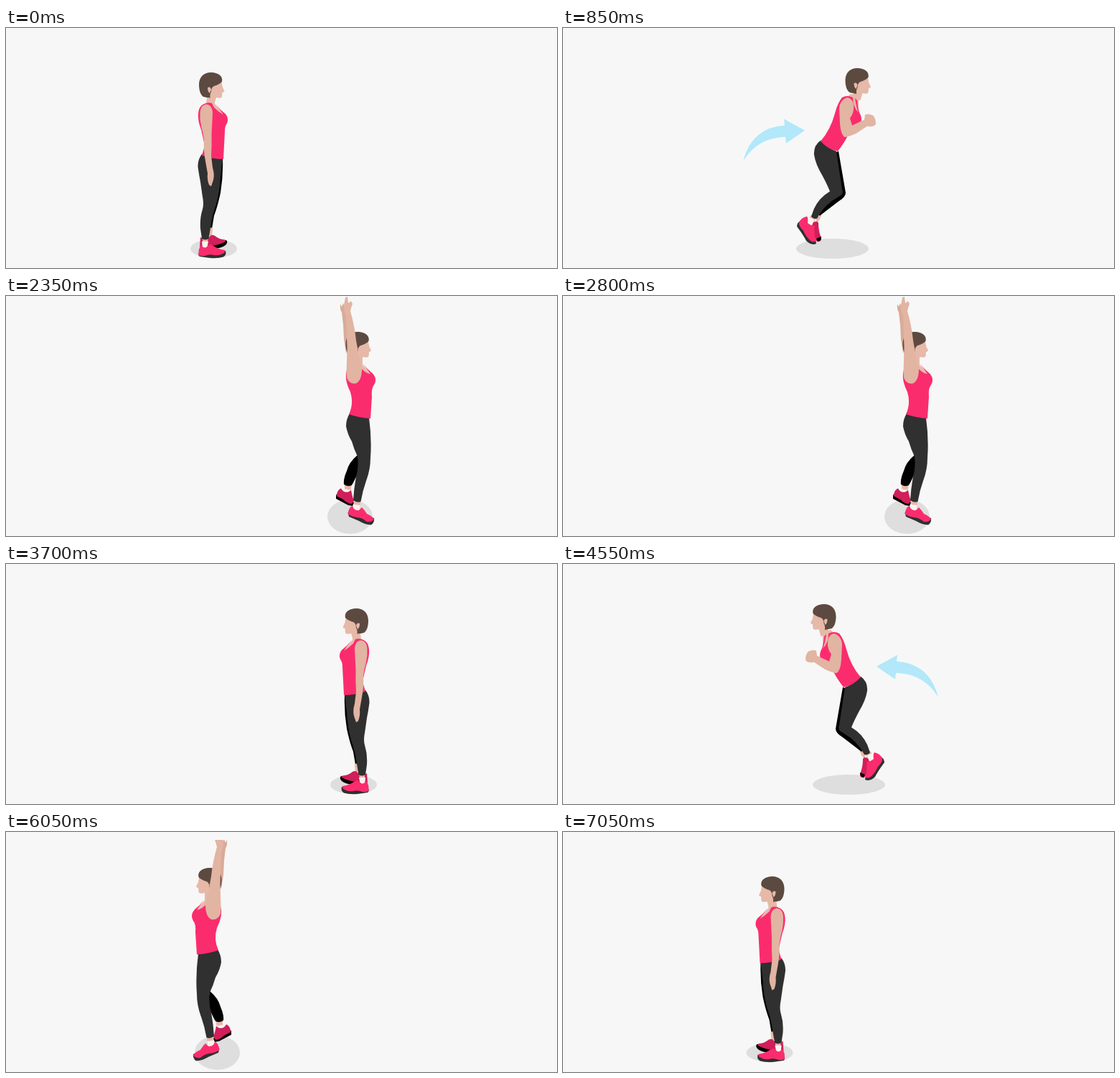
Write an HTML page that moves like this. It is 768 px wide and 335 px high and loops after 7.4 s.

```html
<!DOCTYPE html>
<html lang="en">
<head>
<meta charset="utf-8">
<title>Jump and jacks</title>
<style>
html, body { margin: 0; width: 100%; height: 100%; overflow: hidden; background: #f7f7f7; }
svg { display: block; width: 100vw; height: 100vh; }
.pose { display: none; }
.skin { fill: #e2b4a2; }
.face { fill: #e6b9a8; }
.far { fill: #d9ab98; }
.hair { fill: #5c4a40; }
.top { fill: #fb2c6d; }
.pants { fill: #303030; }
.black { fill: #000; }
.shoe { fill: #fb2c6d; }
.shoe2 { fill: #d01f5a; }
.sock { fill: #fbf3f0; }
.shade { fill: #dedede; }
.arrow { fill: #b2e8fa; }
</style>
</head>
<body>
<svg viewBox="0 0 768 335">
<defs>
  <g id="head">
    <path class="face" d="M284 74L300 72Q301 80 302 83L304.500 88Q304 90 301.500 90L301 96Q300 99 293 97L290 107L279 105L281 90Z"/>
    <path class="hair" d="M301 75C303 67 295 62 286 62C275 62 269 69 269 79C269 87 271 93 275 96L284.500 98Q284 92 286 89Q286 83 290 81Q297 79 301 75Z"/>
    <path class="face" d="M281 83Q285 81 286 86L284 91Q281 89 281 83Z"/>
  </g>

  <g id="feet">
    <path class="face" d="M283 278L288 279L287 290L283 290Z"/>
    <path class="black" d="M283 298L307 296Q310 299 306 303Q300 308 291 307L282 305Z"/>
    <path class="shoe2" d="M271 292Q277 296 283 292Q286 287 291 290Q297 295 305 295.500Q308 297 304 299Q297 303 285 304L270 306Z"/>
    <path class="face" d="M274 291L282 291L281 301L274 301Z"/>
    <path class="sock" d="M273 298L282 298L280 308L274 308Z"/>
    <path class="pants" d="M268.500 314L306 311Q308 316 303 319.500Q296 322 284 321L270 319Q268 318 268.500 314Z"/>
    <path class="shoe" d="M268.500 317Q268 307 272 303Q276 308 279 306L284 302Q289 303 292 306Q298 309 305 310Q306 313 302 315Q297 318 290 317Q284 315 277 318Q272 319 268.500 317Z"/>
  </g>

  <g id="upper">
    <use href="#head" x="124.500" y="-6"/>
    <g transform="matrix(-1 0 0 1 774 0)">
      <path class="face" d="M362 94L373 92L380 98L372 122L362 118Z"/>
      <path class="top" d="M370 97Q378 93 385 97Q391 104 395 119Q401 142 415 158Q404 170 391 172Q381 159 377 150L362 136Q356 130 359 122Q363 115 364 101L367 98Q365 112 362 118Q370 111 370 97Z"/>
      <path class="skin" d="M369 108Q370 98 378 97Q388 100 389 112L388 133Q387 148 382 152Q378 153 365 147L350 137Q341 139 338 134Q338 126 342 122Q348 119 353 121L354 128L371 136L374 126Q368 118 369 108Z"/>
    </g>
  </g>

  <g id="stand">
    <ellipse class="shade" cx="289.500" cy="308" rx="32.500" ry="13"/>
    <path class="black" d="M292 181L302 182Q303 206 299 230Q295 249 290 262L287 280L281 279Z"/>
    <use href="#feet"/>
    <path class="pants" d="M273 176Q267 184 267.500 194Q269 205 271 215L274 236Q276 245 274 253Q270 265 271 280L273 294Q278 297 282.500 294L285 279Q287 262 293 246Q298 228 299 207L302 182Z"/>
    <use href="#head"/>
    <path class="face" d="M281 97L291 99L291 106L304 122L288 121L279 106Z"/>
    <path class="top" d="M274 107Q280 103 287 105L290 111Q296 117 303 121L292 106Q298 114 306 120Q311 126 308 133Q305 137 305 144L303 183Q288 183 273 178L277 164L272 142Q267 129 268 119Q269 110 274 107Z"/>
    <path class="skin" d="M270.500 119Q271 107 280 106.500Q288 108 288 119L286.500 148Q287 162 286 178L288 195Q291 205 289 212L286 221L283 219Q280 211 281 203L278 186Q275 170 276 157Q275 147 272 137Q270 127 270.500 119Z"/>
  </g>

  <g id="jump">
    <ellipse class="shade" cx="375.500" cy="308" rx="50.500" ry="14"/>
    <g transform="matrix(-1 0 0 1 774 0)">
      <path class="face" d="M412 256L421 264L421 273L416 267Z"/>
      <path class="shoe2" d="M418 272Q420 268 427 272L427 288L420 298Q413 299 414 293Q418 284 418 272Z"/>
      <path class="black" d="M414 291L421 294L419 298Q414 298 414 291Z"/>
      <path class="face" d="M420 264L428 261L434 270L427 274Z"/>
      <path class="sock" d="M424 267L432 264L437 273L427 276Z"/>
      <path class="pants" d="M440 267Q448 271 448 277Q439 289 435 297Q428 304 421 301L422 295Z"/>
      <path class="shoe" d="M423 276Q429 276 433 272Q432 265 434 263Q441 264 445 271Q446 276 439 283Q435 292 429 297Q424 300 421 297Q425 287 423 276Z"/>
      <path class="black" d="M390 172L395 174L388 231L420 258L416 262L390 242Q380 236 380 230Z"/>
      <path class="pants" d="M415 157Q425 164 424 177Q422 190 413 205Q406 218 402 228Q417 237 424 252L428 263Q425 267 420 266Q412 251 400 242L386 233Q383 230 385 225L393 172Q405 168 415 157Z"/>
    </g>
    <use href="#upper"/>
    <path class="arrow" d="M337 143L308 127L309 136Q263 139 251 186Q271 153 310 152L311 161Z"/>
  </g>

  <g id="jack">
    <ellipse class="shade" cx="479.500" cy="308" rx="31.500" ry="24"/>
    <path class="far" d="M466 11L468 15L470 10L475 24L479 60L474 80L471 60L470 40L468 23Q465 18 466 11Z"/>
    <path class="face" d="M472 261L482 263L480 273L472 272Z"/>
    <path class="sock" d="M470 269L481 271L480 278L471 277Z"/>
    <path class="black" d="M460 277L485 288L483 293L477 292L460 283Z"/>
    <path class="shoe2" d="M460.500 279Q462 270 467 268.500Q471 276 478 273L481 271Q483 281 485 286L482 290Q476 290 470 284Z"/>
    <path class="black" d="M490 222Q478 232 475 244Q470 255 471 263Q477 267 482 264Q487 256 493 240Z"/>
    <path class="face" d="M485 284L494 286L494 296L486 295Z"/>
    <path class="sock" d="M484 291L494 292L492 301L484 298Z"/>
    <path class="pants" d="M476.500 302L513 310Q514 316 509 319.500Q500 319 492 314L478 308Z"/>
    <path class="shoe" d="M476.500 304Q478 294 483 293Q485 300 492 299L496 295Q500 299 503 304Q512 308 513 312Q509 316 503 315Q496 309 489 309Q481 308 476.500 304Z"/>
    <path class="pants" d="M479 164Q474 172 474 182Q476 193 482 203Q485 214 490 224Q492 238 488 252Q485 268 484 285Q489 289 494.500 287Q497 272 502 258Q508 242 508 226Q510 199 506 170Z"/>
    <use href="#head" x="204.500" y="-12"/>
    <path class="face" d="M488 83L497 86L497 96L510 111L492 111Z"/>
    <path class="top" d="M475 103L493 99Q501 108 508 109L497 94Q503 102 511 108Q518 116 513 124Q509 129 510 140L508 171Q492 170 478 165Q485 150 480 134Q471 116 475 103Z"/>
    <path class="skin" d="M474.500 107L475.500 72L474 28Q470 19 471 13L473 2L476 1L477 10L481 7L483 11Q481 16 480 21Q486 42 488 62Q491 82 496 101Q496 118 488 122Q479 124 475 114Z"/>
  </g>

  <g id="up">
    <path class="arrow" d="M422 101L439 128H430V158H414V128H405Z"/>
    <path class="arrow" d="M414 162H430V167H414ZM414 170H430V175H414Z"/>
  </g>
</defs>

<g id="stage">
  <g class="pose" data-name="start"><use href="#stand"/></g>
  <g class="pose" data-name="squat">
    <g data-hip="298,199"></g>
    <use href="#up" transform="matrix(1 0 0 -1 -184 276)"/>
  </g>
  <g class="pose" data-name="leap"><use href="#jump"/></g>
  <g class="pose" data-name="land">
    <g data-hip="281,205" transform="translate(196)"></g>
    <path class="arrow" transform="translate(357 110)" d="M43 86L27 57L36 58Q39 12 0 0Q50 10 52 58L61 57Z"/>
  </g>
  <g class="pose" data-name="rise"><use href="#stand" x="196.500"/><use href="#up"/></g>
  <g class="pose" data-name="rest"><use href="#stand" x="196.500"/></g>
  <g class="pose" data-name="jack"><use href="#jack"/></g>
</g>
<rect id="crop" width="768" height="11" fill="#f7f7f7"/>
</svg>
<script>
const HALF = 3700, JACKS = 1900;
const steps = [[350, 'start'], [850, 'squat'], [1050, 'leap'], [1550, 'land'], [JACKS, 'rise']];
const stage = document.getElementById('stage');
const crop = document.getElementById('crop');
const poses = document.querySelectorAll('.pose');

// Bent legs over planted feet, with the torso leaning from the hip point
function crouch(x, y) {
  const leg = (cls, dx) => `<path class="${cls}" transform="translate(${dx})" d="M${x - 14} ${y - 8}
    Q${x - 28} ${y + 2} ${x - 22} ${y + 17} Q${x - 14} ${y + 30} 294 243 Q278 262 273 293
    Q278 297 283 294 Q292 272 312 251 Q319 243 313 234 L${x + 11} ${y + 8}Z"/>`;
  return `<ellipse class="shade" cx="289.500" cy="308" rx="32.500" ry="13"/>
    ${leg('black', 4)}<use href="#feet"/>${leg('pants', 0)}
    <use href="#upper" transform="translate(${x - 372} ${y - 165}) rotate(10 372 165)"/>`;
}
for (const g of document.querySelectorAll('[data-hip]'))
  g.innerHTML = crouch(...g.dataset.hip.split(',').map(Number));

function poseAt(t) {
  const step = steps.find(([end]) => t < end);
  if (step) return step[1];
  return (t - JACKS) % 450 < 100 ? 'jack' : 'rest';
}

function draw(now) {
  const t = now % (2 * HALF), back = t >= HALF, name = poseAt(t % HALF);
  for (const p of poses) p.style.display = p.dataset.name === name ? 'inline' : 'none';
  stage.setAttribute('transform', back ? 'matrix(-1 0 0 1 774 0)' : '');
  crop.style.display = back ? 'inline' : 'none';
}

const begin = performance.now();
function tick() {
  draw(performance.now() - begin);
  requestAnimationFrame(tick);
}
tick();
</script>
</body>
</html>
```
